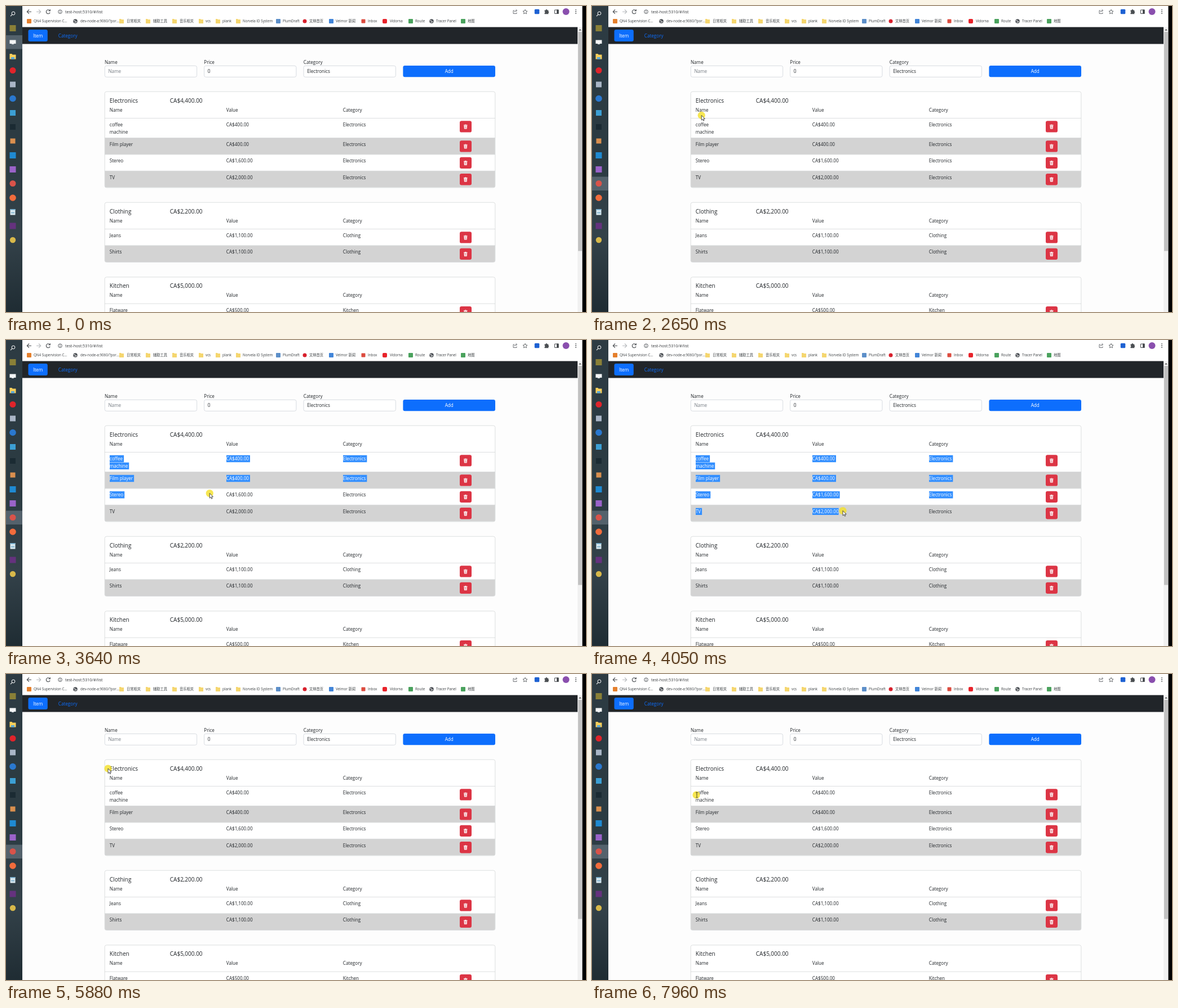
These frames come from a looping animation (1029 by 544 pixels, 8000 ms). An HTML page:

```html
<!DOCTYPE html>
<html lang="en">
<head>
<meta charset="utf-8">
<title>Item list</title>
<style>
html, body { margin: 0; width: 100%; height: 100%; overflow: hidden; background: #fff; }
#stage { display: block; width: 100%; height: 100%; }
text { font-family: "Open Sans", "Noto Sans", "Noto Sans CJK SC", "Noto Sans CJK", sans-serif; white-space: pre; }
</style>
</head>
<body>
<svg id="stage" viewBox="0 0 1029 544"></svg>
<script>
const LOOP = 8000, INK = '#212529', BLUE = '#0d6efd', SELECT = '#338fff';
const stage = document.getElementById('stage');

const attrs = o => Object.entries(o).map(([k, v]) => ` ${k}="${v}"`).join('');
const rect = (x, y, w, h, fill, o = {}) => `<rect x="${x}" y="${y}" width="${w}" height="${h}" fill="${fill}"${attrs(o)}/>`;
const dot = (x, y, r, fill, o = {}) => `<circle cx="${x}" cy="${y}" r="${r}" fill="${fill}"${attrs(o)}/>`;
const line = (d, stroke, width = 1, o = {}) => `<path d="${d}" fill="none" stroke="${stroke}" stroke-width="${width}"${attrs(o)}/>`;
const shape = (d, fill, o = {}) => `<path d="${d}" fill="${fill}"${attrs(o)}/>`;
const text = (x, y, s, size = 8.1, fill = INK, o = {}) => `<text x="${x}" y="${y}" font-size="${size}" fill="${fill}"${attrs(o)}>${s}</text>`;
const tile = (x, y, s, fill, r = 0) => rect(x - s / 2, y - s / 2, s, s, fill, { rx: r });

const folder = (x, y) => shape(`M${x - 4} ${y - 4}h3l1 1h4v7h-8z`, '#f5d66f');
const globe = (x, y) => dot(x, y, 3.8, '#4d5156') +
  line(`M${x - 3} ${y - 1}q3 -1 3 1t3 1M${x - 1} ${y + 3}l1 -2`, '#fff', .9);
const monitor = (x, y, w = 11) => rect(x - w / 2, y - 3.5, w, 6.5, '#f3f5f6') + rect(x - 2, y + 3, 4, 1.2, '#cfd5d9');

function taskbar() {
  const defs = `<linearGradient id="bar" x2="0" y2="1"><stop stop-color="#2d3b43"/><stop offset=".5" stop-color="#2b3b42"/>
    <stop offset=".75" stop-color="#34424a"/><stop offset="1" stop-color="#1f2c33"/></linearGradient>`;
  const apps = [
    tile(12, 39.5, 11, '#8a8037'),
    monitor(12, 64),
    shape('M6.500 85h4l1 1.500h6v8h-11z', '#f6cf5b') + rect(9, 91, 6, 3.5, '#58a9dd'),
    dot(12, 114.5, 5.5, '#e0242b'),
    tile(12, 139.5, 10, '#a9b5c6'),
    dot(12, 164.5, 5.8, '#2a78cf'),
    tile(12, 190, 10, '#3c9fd4'),
    tile(12, 215, 10, '#1b2b33'),
    tile(12, 240, 9, '#d98f4e'),
    tile(12, 265.5, 11, '#1f8ad2'),
    tile(12, 290.5, 11, '#9a63c9'),
    dot(12, 315.5, 5.5, '#d9534a'),
    dot(12, 341, 5.8, '#f26c3c'),
    rect(7.5, 361, 9, 10.5, '#dcebf2') + rect(7.5, 361, 9, 2, '#7fb4d2') + rect(9, 366, 6, 3, '#9cc3d8'),
    tile(12, 391, 11, '#65327e'),
    dot(12, 416, 5.2, '#d8b84a')
  ];
  const tray = monitor(7, 468, 8) + line('M18 465l3.300 3-3.300 3', '#fff') +
    line('M3.500 478.500h7v4.500h-7zM7 483v2M2 485.500h5', '#fff') +
    shape('M15 479.800h1.700l2-2v6.400l-2-2H15z', '#fff') + line('M20 479q1.500 2 0 4M22 477.500q2.500 3.500 0 7', '#fff', .8) +
    text(-1, 499.5, '英', 7, '#fff') +
    line('M14.500 493.500h7.500v6h-7.500zM17 493.500v6M19.500 493.500v6M14.500 496.500h7.500', '#fff', .9) +
    text(12, 518.5, '2:06 PM', 6.3, '#fff', { 'text-anchor': 'middle' }) +
    text(11.7, 527.5, '6/16/2022', 6.3, '#fff', { 'text-anchor': 'middle' }) +
    rect(8, 540, 9, 4, '#f3f5f6');
  return `<defs>${defs}</defs>` + rect(0, 0, 29, 544, 'url(#bar)') +
    rect(0, 52, 29, 24.5, '#54626c', { id: 'focus' }) +
    dot(13, 13, 2.9, 'none', { stroke: '#fff' }) + line('M11 15.200l-3 3', '#fff', 1.1) + apps.join('');
}

function toolbar() {
  const dark = '#45494d';
  const marks = [
    [tile(41, 27, 8, '#e5802d', 1), 49, 'QN4 Supervision C...'],
    [globe(123, 27), 132, 'dev-node-a:9060/?por...'],
    [folder(205, 27), 214, '日常相关'],
    [folder(252, 27), 261, '辅助工具'],
    [folder(299, 27), 308, '音乐相关'],
    [folder(346, 27), 354, 'vcs'],
    [folder(376, 27), 384, 'plank'],
    [folder(412, 27), 420, 'Norvela ID System'],
    [tile(483, 27, 8, '#5d8fc9', 1), 491, 'PlumDraft'],
    [dot(530, 27, 3.5, '#d8202c'), 538, '文林首页'],
    [tile(577, 27, 8, '#4285d8', 1), 585, 'Velmor 新闻'],
    [tile(634, 27, 7, '#dc4b3e', 1), 642, 'Inbox'],
    [tile(672, 27, 8, '#e8232a', 2), 681, 'Vidorna'],
    [tile(718, 27, 8, '#4aa25d', 1), 726, 'Route'],
    [globe(755, 27), 763, 'Tracer Panel'],
    [tile(811, 27, 8, '#4aa25d', 1), 819, '地图']
  ];
  return rect(29, 0, 994, 38, '#fff') +
    line('M45 10.200h-7.500M41 6.500l-3.700 3.700 3.700 3.700', dark, 1.1) +
    line('M54 10.200h7.500M58 6.500l3.700 3.700-3.700 3.700', '#b4b7ba', 1.1) +
    line('M77.500 8a3.500 3.500 0 1 0 .6 3.500M78.300 6v2.700h-2.700', dark, 1.1) +
    dot(96, 10.2, 3.3, 'none', { stroke: dark, 'stroke-width': .9 }) + line('M96 9.600v2.600M96 8v.8', dark, .9) +
    text(105, 12.8, 'test-host:5310/#/list', 7.1, '#35383b') +
    line('M902 8h-2v5.500h6v-2M902 11q.5-3 4-3M904.500 6l2.200 2-2.200 2', '#5f6368', .9) +
    shape('M921 6.300l1.200 2.600 2.800.3-2.100 1.900.6 2.800-2.500-1.400-2.500 1.400.6-2.800-2.100-1.900 2.800-.3z', 'none', { stroke: dark, 'stroke-width': .8 }) +
    tile(942, 10, 8.5, '#1d61d2', 1.5) +
    shape('M955.500 7.500h2a1.400 1.400 0 0 1 2.800 0h2v2.200a1.400 1.400 0 0 1 0 2.600v2h-6.800v-2a1.400 1.400 0 0 0 0-2.600z', '#4a4e52') +
    line('M973.500 7h6.500v6.500h-6.500z', dark, 1) + rect(977, 6.5, 3.5, 7.5, dark) +
    dot(993.5, 10, 6, '#8a4fae') +
    [6.8, 10, 13.2].map(y => dot(1011, y, .9, dark)).join('') +
    marks.map(([icon, x, label]) => icon + text(x, 29.4, label, 6.25, '#3c4043')).join('');
}

function navAndForm() {
  const field = (x, label, value, fill) => text(x, 102.8, label) +
    rect(x + .3, 106.3, 163.3, 20, '#fff', { rx: 3, stroke: '#ced4da', 'stroke-width': .8 }) +
    text(x + 6.4, 119.4, value, 8.1, fill);
  return rect(29, 37.5, 985, 30, INK) +
    rect(39.5, 42, 34.3, 21, BLUE, { rx: 3.2 }) + text(56.6, 55.7, 'Item', 8.1, '#fff', { 'text-anchor': 'middle' }) +
    text(92.8, 55.7, 'Category', 8.1, BLUE) +
    field(175, 'Name', 'Name', '#757c83') + field(351.3, 'Price', '0', INK) + field(527.8, 'Category', 'Electronics', INK) +
    rect(704.4, 106, 163.6, 20.3, BLUE, { rx: 3.2 }) + text(786.2, 119.4, 'Add', 8.1, '#fff', { 'text-anchor': 'middle' });
}

const COLS = [183.8, 390.8, 597.8];
const cells = [];   // selectable text of the first card
const rowTops = [152];

function trash(y) {
  return rect(805, y, 21, 20.3, '#dc3545', { rx: 3.2 }) +
    rect(812, y + 7, 6.6, 1.3, '#fff', { rx: .4 }) + rect(814.2, y + 6.3, 2.2, 1, '#fff') +
    shape(`M812.500 ${y + 8.7}h5.600l-.4 5.100q-.1.500-.6.500h-3.600q-.5 0-.6-.5z`, '#fff') +
    line(`M814.200 ${y + 9.6}v3.700M815.300 ${y + 9.6}v3.700M816.400 ${y + 9.6}v3.700`, '#dc3545', .45);
}

function card(top, name, total, rows, selectable) {
  const put = (x, y, s, row, head) => {
    if (selectable) cells.push({ x, y, s, row, head });
    return text(x, y, s, head ? 10 : 8.1, INK, head ? { 'font-weight': 500 } : {});
  };
  let out = '', y = top + 47.5;
  rows.forEach(([label, value], i) => {
    const lines = label.split('|'), h = lines.length > 1 ? 35 : 29.4;
    if (selectable) rowTops.push(y);
    if (i % 2) out += rect(175.3, y, 692.4, h, '#d3d3d3');
    out += line(`M175 ${y}h693`, '#d5d7d9', .8);
    lines.forEach((s, j) => out += put(COLS[0], y + 14.3 + j * 12.9, s, i + 1));
    out += put(COLS[1], y + 14.3, value, i + 1) + put(COLS[2], y + 14.3, name, i + 1) + trash(y + 4.8);
    y += h;
  });
  return `<clipPath id="card${top}">${rect(175, top, 693, y - top, '#fff', { rx: 3.2 })}</clipPath>` +
    `<g clip-path="url(#card${top})">${rect(175, top, 693, y - top, '#fff')}${out}</g>` +
    rect(175.2, top + .2, 692.6, y - top, 'none', { rx: 3.2, stroke: '#d5d7d9', 'stroke-width': .8 }) +
    put(COLS[0], top + 19.5, name, 0, true) + put(290.8, top + 19.5, total, 0, true) +
    ['Name', 'Value', 'Category'].map((s, i) => text(COLS[i], top + 35.6, s)).join('');
}

const page = rect(29, 0, 985, 544, '#fdfdfd') + toolbar() + navAndForm() +
  card(152, 'Electronics', 'CA$4,400.00', [['coffee|machine', 'CA$400.00'], ['Film player', 'CA$400.00'],
    ['Stereo', 'CA$1,600.00'], ['TV', 'CA$2,000.00']], true) +
  card(349, 'Clothing', 'CA$2,200.00', [['Jeans', 'CA$1,100.00'], ['Shirts', 'CA$1,100.00']]) +
  card(481.7, 'Kitchen', 'CA$5,000.00', [['Flatware', 'CA$500.00']]) +
  rect(1014, 37.5, 9, 506.5, '#f1f1f1') + rect(1015, 46, 7, 389.5, '#c1c1c1') +
  shape('M1016 43.500l2.500-2.500 2.500 2.500z', '#505050') + rect(1022.5, 0, 6.5, 544, '#000');

const trayMarkup = taskbar();
const marked = cells.map(c => {
  const up = c.head ? 11.5 : 9.2, size = c.head ? 10 : 8.1;
  return `<svg class="mark" x="${c.x}" y="${c.y - up}" width="0" height="${c.head ? 14.7 : 12.6}">${rect(0, 0, 99, 15, SELECT)}` +
    text(0, up, c.s, size, '#fff', c.head ? { 'font-weight': 500 } : {}) + '</svg>';
}).join('');
stage.innerHTML = page + trayMarkup + marked + `<g id="cursor">${dot(0, 0, 6.6, '#f4e02c', { id: 'halo', opacity: .82 })}
  ${shape('M0 0v8.600l2-1.800 1.400 3 1.400-.6-1.300-3h2.700z', '#fff', { id: 'arrow', stroke: '#222', 'stroke-width': .8 })}
  ${line('M-1.800 -4.500h1.300l.5.400.5-.4h1.300M0 -4v8M-1.800 4.500h1.300l.5-.4.500.4h1.300', '#222', .8, { id: 'beam' })}</g>`;

const get = id => document.getElementById(id);
const [focus, cursor, halo, arrow, beam] = ['focus', 'cursor', 'halo', 'arrow', 'beam'].map(get);
const marks = [...document.querySelectorAll('.mark')];
marks.forEach((m, i) => cells[i].w = m.querySelector('text').getComputedTextLength());

// Pointer moves: the path is walked in n even jumps from start to end.
const moves = [
  { start: 200, end: 1190, n: 6, path: [[883, 513], [452, 332], [300, 262], [280.5, 243.5]] },
  { start: 1410, end: 1590, n: 2, path: [[228, 152], [207.5, 112]] },
  { start: 2000, end: 3010, n: 6, path: [[209, 124], [196, 190], [187, 212]], press: k => k === 3 },
  { start: 3230, end: 4050, n: 5, path: [[277.5, 241.5], [445, 303.5]], press: () => true, anchor: 1 },
  { start: 4240, n: 1, path: [[446, 306.5]], anchor: 1 },
  { start: 4480, n: 1, path: [[446, 306.5]], press: () => true },
  { start: 4680, end: 5270, n: 4, path: [[330, 235], [247.5, 187.5], [205, 174], [187.5, 169]] },
  { start: 5470, n: 1, path: [[187.5, 170]], press: () => true },
  { start: 5700, end: 6720, n: 6, path: [[181, 168], [290, 168], [370.5, 170.5]], press: () => true, anchor: 0 },
  { start: 6900, n: 1, path: [[370.5, 170.5]], press: () => true },
  { start: 7110, end: 7730, n: 4, path: [[300, 215], [225, 232], [195, 220], [186, 215]] },
  { start: 7960, n: 1, path: [[186, 215]], press: () => true }
];

function along(path, u) {
  const p = u * (path.length - 1), i = Math.min(Math.floor(p), path.length - 2), f = p - i;
  return path.length < 2 ? path[0] : path[i].map((v, a) => v + (path[i + 1][a] - v) * f);
}

const overText = (x, y) => (x > 175 && x < 338 && y > 106 && y < 126) ||
  cells.some(c => x >= c.x && x <= c.x + c.w && y > c.y - 9 && y < c.y + 4);

function markedWidth(c, anchor, row, x) {
  if (c.row < anchor || c.row > row) return 0;
  if (c.row < row || x > c.x + 100) return c.w + 2;
  return Math.max(0, Math.min(x - c.x, c.w));
}

const show = (el, on) => el.setAttribute('visibility', on ? 'visible' : 'hidden');

function draw(t) {
  const move = moves.filter(m => m.start <= t).pop();
  [cursor, halo, arrow, beam].forEach(el => show(el, false));
  focus.setAttribute('y', t < 2606 ? 52 : 303.5);
  let widths = cells.map(() => 0);
  if (move) {
    const { start, end, n, path, press, anchor } = move;
    const k = n > 1 ? Math.min(n - 1, Math.floor((t - start) / (end - start) * (n - 1) + 1e-6)) : 0;
    const [x, y] = along(path, n > 1 ? k / (n - 1) : 0);
    const isBeam = overText(x, y);
    cursor.setAttribute('transform', `translate(${x} ${y})`);
    halo.setAttribute('cx', isBeam ? -1 : 0);
    show(halo, press && press(k));
    show(arrow, !isBeam);
    show(beam, isBeam);
    if (anchor !== undefined) {
      const row = rowTops.filter(top => top <= y).length - 1;
      widths = cells.map(c => markedWidth(c, anchor, row, x));
    }
  }
  marks.forEach((m, i) => {
    m.setAttribute('width', widths[i]);
    m.setAttribute('display', widths[i] ? 'inline' : 'none');
  });
}

const began = performance.now();
function tick() {
  draw((performance.now() - began) % LOOP);
  requestAnimationFrame(tick);
}
tick();
</script>
</body>
</html>
```
